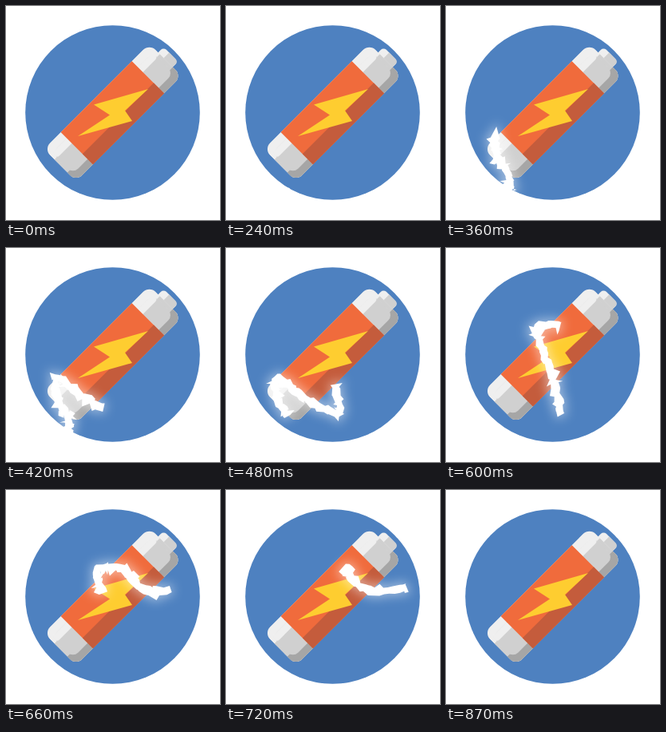
Write an HTML page that moves like this. It is 268 by 268 pixels and loops after 1.8 s.

```html
<!DOCTYPE html>
<html lang="en">
<head>
<meta charset="utf-8">
<title>Battery</title>
<style>
  html, body { margin: 0; height: 100%; overflow: hidden; background: #fff; }
  svg { display: block; width: 100vw; height: 100vh; }
</style>
</head>
<body>
<svg viewBox="0 0 268 268">
  <defs>
    <clipPath id="shell"><rect x="-93" y="-28.500" width="187" height="57" rx="11"/></clipPath>
    <clipPath id="nub"><rect x="82" y="-13" width="21.500" height="26" rx="5"/></clipPath>
    <filter id="blur" x="-100%" y="-100%" width="300%" height="300%"><feGaussianBlur stdDeviation="7"/></filter>
  </defs>
  <circle cx="133.5" cy="133.5" r="109.3" fill="#4e81c0"/>
  <g transform="translate(133.3 133.7) rotate(-45)">
    <g clip-path="url(#nub)">
      <rect x="82" y="-13" width="22" height="26" fill="#efefef"/>
      <rect x="82" y="-3" width="22" height="16" fill="#d0d0d0"/>
    </g>
    <g clip-path="url(#shell)">
      <rect x="-93" y="-29" width="187" height="58" fill="#efefef"/>
      <rect x="-93" y="-10" width="187" height="39" fill="#d0d0d0"/>
      <rect x="-93" y="13" width="187" height="16" fill="#a6a6a6"/>
      <rect x="-89" y="-18" width="178" height="37" rx="9" fill="#d0d0d0"/>
      <rect x="-89" y="-18" width="178" height="9" rx="4" fill="#efefef"/>
      <rect x="-63" y="-29" width="126" height="58" fill="#f06b3c"/>
      <rect x="-63" y="10" width="126" height="19" fill="#c45c3c"/>
    </g>
  </g>
  <path d="M178 104L110 123.500L130 136.500L90 163L158 144L149 131Z" fill="#fecd30"/>
  <g id="arc" fill="#fff">
    <path id="glow" filter="url(#blur)" stroke="#fff" stroke-width="4"/>
    <path id="spark"/>
  </g>
</svg>
<script>
const LOOP = 1800, STEP = 30, BEGIN = 240, BEAT = 120;

// Key points of the discharge as it winds up the battery
const course = [
  [78, 232], [78, 212], [64, 188], [65, 163], [98, 187], [141, 207],
  [136, 172], [122, 130], [114, 100], [144, 99], [176, 125], [228, 122]
];
const last = course.length - 1;
const arc = document.getElementById('arc');
const glow = document.getElementById('glow');
const spark = document.getElementById('spark');

function random(seed) {
  return () => {
    seed = (seed * 16807) % 2147483647;
    return seed / 2147483647;
  };
}

// Catmull-Rom point at position s
function pointAt(s) {
  const i = Math.min(Math.floor(s), last - 1), u = s - i;
  const at = k => course[Math.max(0, Math.min(last, k))];
  const [a, b, c, d] = [at(i - 1), at(i), at(i + 1), at(i + 2)];
  return [0, 1].map(k => b[k] + u / 2 * (c[k] - a[k]
    + u * (2 * a[k] - 5 * b[k] + 4 * c[k] - d[k]
    + u * (3 * (b[k] - c[k]) + d[k] - a[k]))));
}

// Ragged ribbon along the course from tail to head
function ribbon(tail, head, width, rnd) {
  const count = Math.max(6, Math.round((head - tail) * 10));
  const left = [], right = [];
  for (let i = 0; i <= count; i++) {
    const s = tail + (head - tail) * i / count;
    const [x, y] = pointAt(s);
    const [x0, y0] = pointAt(Math.max(0, s - 0.05));
    const [x1, y1] = pointAt(Math.min(last, s + 0.05));
    const len = Math.hypot(x1 - x0, y1 - y0) || 1;
    const dx = (x1 - x0) / len, dy = (y1 - y0) / len;
    const edge = side => {
      const spike = rnd() < 0.2 ? 1.9 : 1;
      const off = side * width * (0.45 + 0.55 * rnd()) * spike;
      const slip = (rnd() - 0.5) * width;
      return [x - dy * off + dx * slip, y + dx * off + dy * slip].map(v => v.toFixed(1));
    };
    left.push(edge(1));
    right.unshift(edge(-1));
  }
  return 'M' + left.concat(right).join('L') + 'Z';
}

function draw(now) {
  const t = Math.floor((now % LOOP) / STEP) * STEP;
  const beat = (t - BEGIN) / BEAT;
  const head = Math.min(last, Math.max(0.3, 3 * beat));
  const tail = Math.max(0, 4 * beat - 7);   // leaves later, but catches up
  const on = beat >= 0 && tail < head;
  arc.style.display = on ? '' : 'none';
  if (!on) return;
  const d = ribbon(tail, head, 6.5 * Math.min(1, 0.15 + beat), random(t * 97 + 13));
  spark.setAttribute('d', d);
  glow.setAttribute('d', d);
  glow.setAttribute('opacity', Math.min(0.5, beat));
}

const start = performance.now();
function frame() {
  draw(performance.now() - start);
  requestAnimationFrame(frame);
}
frame();
</script>
</body>
</html>
```
